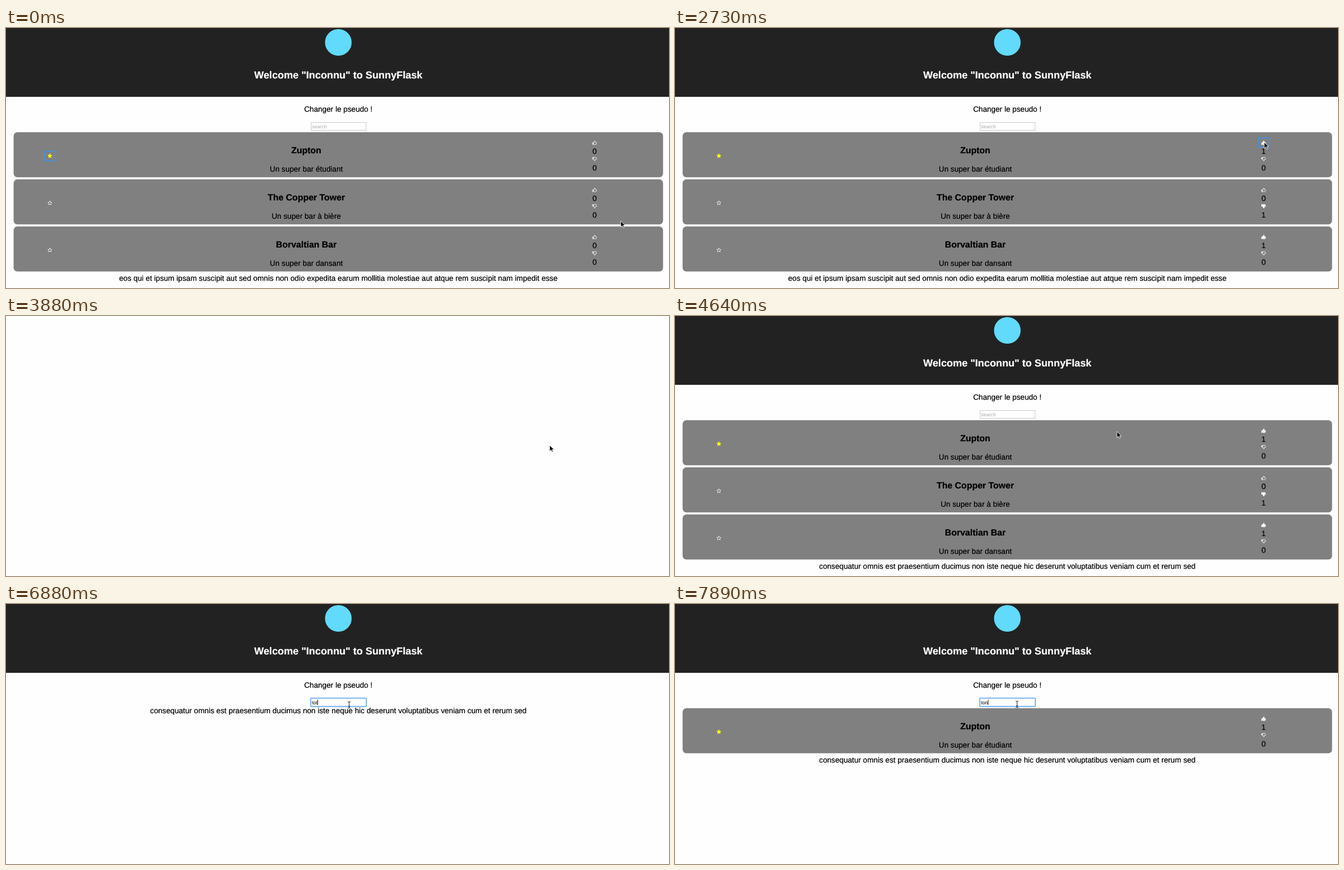
An HTML page that plays this animation: 1194 px wide and 469 px high, repeating every 8000 ms.

```html
<!DOCTYPE html>
<html lang="fr">
<head>
<meta charset="utf-8">
<style>
  html, body { margin: 0; width: 100%; height: 100%; overflow: hidden; background: #fefefe; }
  svg { display: block; width: 100%; height: 100%; font: 13.68px "Liberation Sans", Arial, sans-serif; }
  text { fill: currentColor; stroke: currentColor; stroke-width: .22; text-rendering: geometricPrecision; }
  .mid { text-anchor: middle; }
  .title { font-size: 16px; font-weight: bold; }
  .heading { font-size: 18.25px; font-weight: bold; color: #fff; }
  .field { font-size: 9px; stroke: none; }
  .icon { fill: none; stroke: #fff; stroke-width: .8; stroke-linejoin: round; }
  .icon.on { fill: #fff; }
  .icon.gold { fill: #ff0; stroke: #ff0; }
  .ring { fill: none; stroke: #4a90d9; stroke-width: 2; }
</style>
</head>
<body>
<svg id="stage" viewBox="0 0 1194 469"></svg>
<script>
const LOOP = 8000;
const CENTER = 598.5;
const CARD_CENTER = 540.8;
const RELOAD = { start: 3880, page: 4110, icons: 4260, quote: 4560 };
const FOCUS_AT = 5350;

const bars = [
  { name: 'Zupton', note: 'Un super bar étudiant', favorite: true },
  { name: 'The Copper Tower', note: 'Un super bar à bière' },
  { name: 'Borvaltian Bar', note: 'Un super bar dansant' },
];
const quotes = [
  'eos qui et ipsum ipsam suscipit aut sed omnis non odio expedita earum mollitia molestiae aut atque rem suscipit nam impedit esse',
  'consequatur omnis est praesentium ducimus non iste neque hic deserunt voluptatibus veniam cum et rerum sed',
];
const votes = [
  { at: 700, bar: 1, kind: 'down' },
  { at: 1350, bar: 2, kind: 'up' },
  { at: 2400, bar: 0, kind: 'up' },
];
const typing = [
  { at: FOCUS_AT, text: '' },
  { at: 6250, text: 't' },
  { at: 6600, text: 'to' },
  { at: 6820, text: 'tot' },
  { at: 7300, text: 'to' },
  { at: 7750, text: 'ton' },
];
// Pointer stops: time, x, y
const pointer = [
  [50, 1107, 348], [620, 1061, 322], [900, 1061, 322], [1280, 1061, 378],
  [1480, 1062, 385], [1670, 1062, 383], [1730, 1081, 252], [2300, 1061, 206],
  [2740, 1061, 206], [3420, 979, 233], [4260, 979, 233], [5030, 607, 183],
  [5250, 606, 180], [5900, 606, 180], [6500, 618, 182], [7000, 618, 182],
  [7600, 616, 181],
];

const starPath = 'M' + Array.from({ length: 10 }, (_, i) => {
  const angle = i * Math.PI / 5 - Math.PI / 2;
  const radius = i % 2 ? 1.8 : 4;
  return `${(radius * Math.cos(angle)).toFixed(2)} ${(radius * Math.sin(angle)).toFixed(2)}`;
}).join('L') + 'Z';
const thumbPath = 'M-3.7-.2H-2.2V3.2H-3.7ZM-2-.2L0-3.3Q1.3-3.8 1.1-2L.8-.7H3Q3.9-.5 3.6.5L3 2.7Q2.8 3.3 2 3.3H0L-2 2.8Z';

const last = (list, t) => list.filter(item => item.at <= t).pop();

function pointerAt(t) {
  const next = pointer.findIndex(stop => stop[0] > t);
  if (next === 0) return pointer[0].slice(1);
  if (next < 0) return pointer[pointer.length - 1].slice(1);
  const [t0, x0, y0] = pointer[next - 1];
  const [t1, x1, y1] = pointer[next];
  const p = (t - t0) / (t1 - t0);
  const eased = p * p * (3 - 2 * p);
  return [x0 + (x1 - x0) * eased, y0 + (y1 - y0) * eased];
}

const text = (x, y, content, cls = '') => `<text x="${x}" y="${y}" class="mid ${cls}">${content}</text>`;
const icon = (x, y, path, cls, flip = 1) =>
  `<path class="icon ${cls}" transform="translate(${x} ${y}) scale(1 ${flip})" d="${path}"/>`;
const ring = (x, y) => `<rect class="ring" x="${x - 10}" y="${y - 8.5}" width="20" height="17" rx="1"/>`;

function drawCard(bar, top, t) {
  const index = bars.indexOf(bar);
  const count = kind => votes.filter(v => v.at <= t && v.bar === index && v.kind === kind).length;
  const up = count('up'), down = count('down');
  let out = `<rect x="13.7" y="${top}" width="1169.6" height="81.2" rx="6.8" fill="#808080"/>`
    + text(CARD_CENTER, top + 38, bar.name, 'title')
    + text(CARD_CENTER, top + 71, bar.note)
    + text(1060, top + 38.5, up) + text(1060, top + 68.5, down);
  if (t < RELOAD.start || t >= RELOAD.icons) {
    out += icon(79, top + 42.7, starPath, bar.favorite ? 'gold' : '')
      + icon(1060, top + 19, thumbPath, up ? 'on' : '')
      + icon(1060, top + 48.5, thumbPath, down ? 'on' : '', -1);
  }
  if (t < RELOAD.start) {
    const vote = last(votes, t);
    if (vote && vote.bar === index) out += ring(1060.5, top + (vote.kind === 'up' ? 18.5 : 48));
    if (!vote && index === 0) out += ring(79, top + 43);
  }
  return out;
}

function drawField(t) {
  const entry = last(typing, t);
  const value = entry ? entry.text : '';
  let out = '<rect x="549.5" y="170.5" width="99" height="14" fill="#fff" stroke="#c8c8c8"/>';
  if (entry) {
    out += '<rect x="548.7" y="169.7" width="100.3" height="15.3" rx="1.5" fill="none" stroke="#a9cff8" stroke-width="2.4"/>'
      + '<rect x="549" y="170" width="99.7" height="14.7" rx="1" fill="none" stroke="#6eaef2" stroke-width="1.2"/>';
  }
  out += `<text class="field" x="551" y="180.7" color="${value ? '#000' : '#a9a9a9'}">${value || 'search'}</text>`;
  if (entry && (t - entry.at) % 1000 < 500) {
    const widths = { t: 2.5, o: 5, n: 5 };
    const x = 551.5 + [...value].reduce((sum, letter) => sum + widths[letter], 0);
    out += `<path d="M${x} 172.5V182" stroke="#000" stroke-width=".9"/>`;
  }
  return out;
}

function drawPage(t) {
  const entry = last(typing, t);
  const query = entry ? entry.text : '';
  const shown = bars.filter(bar => bar.name.toLowerCase().includes(query));
  const quoteY = shown.length ? 201 + 85 * shown.length : 197;
  let out = '<rect width="1194" height="124.2" fill="#222"/>'
    + `<circle cx="${CENTER}" cy="26" r="24" fill="#61dafb"/>`
    + text(CENTER, 91, 'Welcome "Inconnu" to SunnyFlask', 'heading')
    + text(CENTER, 151, 'Changer le pseudo !')
    + drawField(t)
    + shown.map((bar, row) => drawCard(bar, 188 + 85 * row, t)).join('');
  if (t < RELOAD.start) out += text(CENTER, quoteY, quotes[0]);
  if (t >= RELOAD.quote) out += text(CENTER, quoteY, quotes[1]);
  return out;
}

function drawPointer(t) {
  const [x, y] = pointerAt(t);
  const shape = t >= 5030
    ? '<path d="M-2.5-6Q0-6 0-4.5Q0-6 2.5-6M0-4.5V4.5M-2.5 6Q0 6 0 4.5Q0 6 2.5 6M-1.5 2.5H1.5" fill="none" stroke="#000" stroke-width=".9"/>'
    : '<path d="M0 0V11L2.6 8.7 4.4 12.6 6.2 11.8 4.5 8H8Z" stroke="#fff" stroke-width=".9"/>';
  return `<g transform="translate(${x} ${y})">${shape}</g>`;
}

const stage = document.getElementById('stage');
function frame() {
  const t = performance.now() % LOOP;
  const blank = t >= RELOAD.start && t < RELOAD.page;
  stage.innerHTML = (blank ? '' : drawPage(t)) + drawPointer(t);
  requestAnimationFrame(frame);
}
frame();
</script>
</body>
</html>
```
